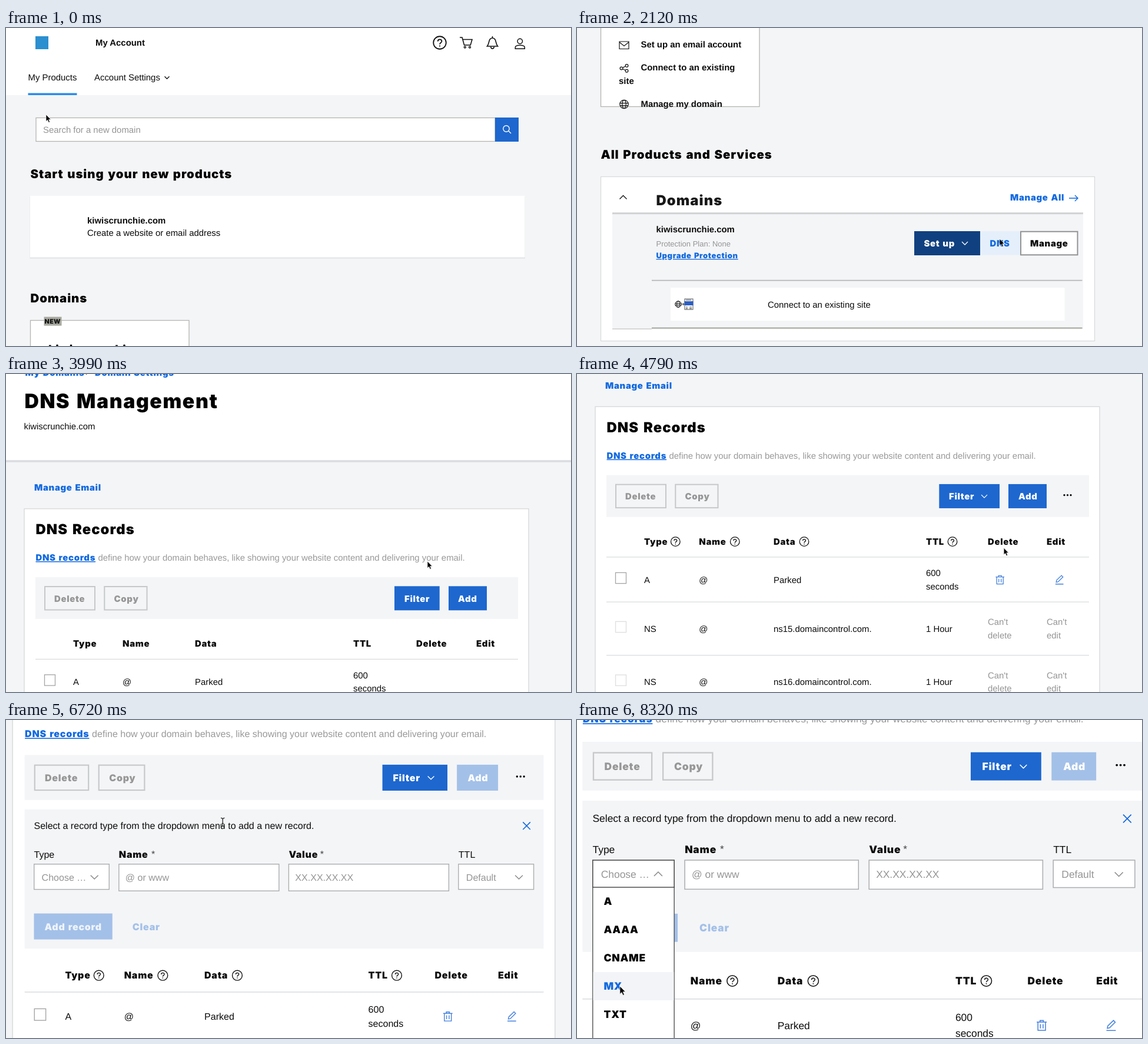
Recreate the animation shown at these times as an HTML page. Size 960 by 540 pixels, loop 8.39 s.

```html
<!DOCTYPE html>
<html lang="en">
<head>
<meta charset="utf-8">
<title>Domain account tour</title>
<style>
html, body { margin: 0; width: 100%; height: 100%; overflow: hidden; background: #f4f5f7; }
svg { display: block; width: 960px; height: 540px; }
text { font: 14.92px "Liberation Sans", Arial, sans-serif; text-rendering: geometricPrecision; white-space: pre; }
.bold { font-weight: 700; }
.black { font-family: Inter, "Arial Black", sans-serif; font-weight: 900; letter-spacing: .046em; word-spacing: .08em; }
.under { text-decoration: underline; }
</style>
</head>
<body>
<svg id="stage" viewBox="0 0 960 540"></svg>
<script>
const LOOP = 8390;
const BLUE = '#1d67cf', LINK = '#1169e0', PALE = '#a3c0e8', GRAY = '#959595', BG = '#f4f5f7';

// Drawing helpers
const text = (x, y, s, { cls = '', fill = '#0c0c0c', size, id } = {}) =>
  `<text ${id ? `id="${id}"` : ''} x="${x}" y="${y}" class="${cls}" fill="${fill}"` +
  `${size ? ` style="font-size:${size}px"` : ''}>${s}</text>`;
const bold = (x, y, s) => text(x, y, s, { cls: 'bold' });
const black = (x, y, s, fill, size, id) => text(x, y, s, { cls: 'black', fill, size, id });
const link = (x, y, s, size) => text(x, y, s, { cls: 'black under', fill: LINK, size });
const rect = (x1, y1, x2, y2, fill, extra = '') =>
  `<rect x="${x1}" y="${y1}" width="${x2 - x1}" height="${y2 - y1}" fill="${fill}" ${extra}/>`;
const frame = (x1, y1, x2, y2, color, w = 1.3, fill = '#fff', extra = '') =>
  rect(x1, y1, x2, y2, fill, `stroke="${color}" stroke-width="${w}" ${extra}`);
const path = (d, color = '#111', w = 1.3, extra = '') =>
  `<path d="${d}" fill="none" stroke="${color}" stroke-width="${w}" ${extra}/>`;
const rule = (x1, x2, y, color, w = 1.3) => path(`M${x1} ${y}H${x2}`, color, w);
const group = (id, body, extra = '') => `<g id="${id}" ${extra}>${body}</g>`;
const at = (x, y, body) => `<g transform="translate(${x} ${y})">${body}</g>`;
const circle = (r, w = 1.3, color = '#111', x = 0, y = 0) =>
  `<circle cx="${x}" cy="${y}" r="${r}" fill="none" stroke="${color}" stroke-width="${w}"/>`;
const chevron = (x, y, color = '#111', w = 5, up = false) => {
  const h = up ? -w / 2 : w / 2;
  return path(`M${x - w} ${y - h}L${x} ${y + h}L${x + w} ${y - h}`, color, 1.3);
};

// Icons, centred on the given point
const help = (x, y, k = 1) => at(x, y, `<g transform="scale(${k})">` + circle(7.8, 1.3) +
  path('M-2.4-1.6C-2.4-4.8 2.6-4.8 2.5-1.8C2.4 0 0 0 0 2M0 3.3V4.8', '#111', 1.3) + '</g>');
const globe = (x, y, r = 7.2, w = 1.2) => at(x, y, circle(r, w) +
  `<ellipse rx="${r * .45}" ry="${r}" fill="none" stroke="#111" stroke-width="${w}"/>` +
  path(`M${-r} ${-r * .25}H${r}M${-r} ${r * .3}H${r}`, '#111', w));
const trash = (x, y) => at(x, y, path('M-7.3-5H7.3M-2.5-5V-7.3H2.5V-5M-5.5-5V7H5.5V-5M-2-2V4.2M2-2V4.2', '#4480de', 1.3));
const pencil = (x, y) => at(x, y, path('M-5.5 4.5L-4.8 1L3.5-7L6-4.4L-2.3 3.8ZM-6.8 7.6H6.8', '#4480de', 1.3));
const cart = at(782, 25, path('M-11-9H-7L-3.4 4H7.2L10-5.5H-5.8', '#111', 1.6) +
  circle(1.5, 1.4, '#111', -2.2, 7.6) + circle(1.5, 1.4, '#111', 6, 7.6));
const bell = at(826.5, 25, path('M-9 6C-5 2-7-8 0-8C7-8 5 2 9 6ZM0-8V-11M-3 7C-2 11 2 11 3 7', '#111', 1.6));
const person = at(873.3, 27, circle(4.2, 1.5, '#111', 0, -4.5) + path('M-8 8.3V6C-8 1 8 1 8 6V8.3Z', '#111', 1.5));
const share = at(81, 111, circle(2.4, 1.2, '#111', -4.5, .5) + circle(2.4, 1.2, '#111', 4.5, -4) +
  circle(2.4, 1.2, '#111', 4.5, 4.8) + path('M-2.3-.6L2.4-3M-2.3 1.7L2.4 3.8', '#111', 1.2));

// Account page
const accountTop =
  rect(0, -5, 962, 114, '#fff') + rect(50, 14, 72, 36, '#2b8fd0') + bold(152, 30, 'My Account') +
  help(737, 25, 1.38) + cart + bell + person +
  text(37.5, 89, 'My Products') + text(150, 89, 'Account Settings') + chevron(273.5, 84.3, '#111', 4) +
  rect(37.5, 110.5, 120.5, 114, '#2a8cec') +
  frame(51, 152.5, 831, 192.5, '#b4b5b0') + text(63, 177.5, 'Search for a new domain', { fill: GRAY }) +
  rect(831, 152, 871, 193, BLUE) + circle(5.2, 1.4, '#fff', 850, 171) + path('M854 175L858 179', '#fff', 1.4) +
  black(41.5, 255, 'Start using your new products', '#000', 20.4) +
  rect(40.5, 286, 882, 391.5, '#e2e4e6') + rect(41, 285, 881.5, 389.5, '#fff') +
  bold(138, 331.7, 'kiwiscrunchie.com') + text(138, 353.3, 'Create a website or email address') +
  black(41.5, 466, 'Domains', '#000', 20.4) +
  frame(41.5, 496.5, 311, 746.5, '#b4b5b0') + rect(64.5, 490.5, 94.5, 505.5, '#a8a89f') +
  black(65.5, 502, 'NEW', '#111', 10.6) + black(72, 552, 'kiwiscrunchie.com', '#000', 18.7);

const serverIcon = globe(173, 512, 5.2, 1) + path('M179 512H183M181 510L183 512L181 514', '#333', 1) +
  frame(184, 503, 198, 521, '#555', 1) + rect(183.5, 507, 198.5, 514, '#2d5fc4') +
  path('M186 505H195M186 517H189M192 517H196M186 519.5H189M192 519.5H196', '#444', 1);

const accountBottom =
  at(81, 33, path('M-7-6H7V6.5H-7ZM-7-2H7M-4.5-4H-2', '#111', 1.2)) +
  at(81, 72, path('M-8-6H8V6.5H-8ZM-8-5L0 1.5L8-5', '#111', 1.2)) + share + globe(81, 172.5) +
  bold(109.5, 37.7, 'Create a website') + bold(109.5, 76.3, 'Set up an email account') +
  bold(109.5, 114.8, 'Connect to an existing') + bold(72, 138.3, 'site') + bold(109.5, 177.3, 'Manage my domain') +
  black(41.5, 265, 'All Products and Services', '#000', 20.4) +
  frame(41.5, 295.5, 880.5, 574.5, '#d8dadc') + chevron(79.5, 330.5, '#111', 6, true) +
  black(135.5, 344, 'Domains', '#181818', 23.8) + black(737, 336.3, 'Manage All', LINK) +
  path('M837 332H852M847 327L852 332L847 337', LINK, 1.4) +
  group('rowHover', rect(61, 359, 861, 554, BG)) + rule(61, 861, 357.8, '#d0d1d2', 3) +
  bold(135.5, 390, 'kiwiscrunchie.com') +
  text(135.5, 413.5, 'Protection Plan: None', { fill: GRAY, size: 13 }) + link(135.5, 434, 'Upgrade Protection', 13.1) +
  group('dnsHover', rect(686, 388, 755, 428.5, '#e5effc')) +
  rect(574, 388, 686, 429, '#10407f') + black(590.5, 414, 'Set up', '#fff') + chevron(660, 408.5, '#fff') +
  black(702.5, 414, 'DNS', LINK) + frame(755, 388.7, 851.5, 428.3, '#929292', 2) + black(771, 414, 'Manage') +
  rect(128.5, 472, 860, 553, BG) + rule(128, 859.5, 471.6, '#b5b6b5', 1.6) + rule(61, 128, 554, '#ccc') +
  rule(128, 859.5, 552.6, '#a3a59b', 2) + rect(160, 484, 829.5, 540, '#fff') + serverIcon +
  text(325, 517.5, 'Connect to an existing site');

// DNS page
const outlineButton = (x1, x2, label, tx) => frame(x1, 94, x2, 133.5, '#c6c8ca', 2, BG) + black(tx, 119.5, label, '#979797');
const button = (x1, x2, label, tx, id = '') => rect(x1, 93.3, x2, 134.3, BLUE, id && `id="${id}"`) + black(tx, 119.5, label, '#fff');

const dnsTop = at(0, -267,
  rect(-20, -60, 1000, 148, '#fff') + rule(-20, 1000, 148, '#dadce0', 3.4) +
  black(32.5, 3, 'My Domains', LINK) + path('M136-5L139-2L136 1', '#555', 1.2) + black(151, 3, 'Domain Settings', LINK) +
  black(31.5, 57.5, 'DNS Management', '#000', 33.8) + text(30.5, 94, 'kiwiscrunchie.com') +
  black(48, 198.3, 'Manage Email', LINK) + frame(31, 228.8, 888, 1500, '#d6d8db') +
  black(50.5, 272, 'DNS Records', '#000', 23.8) + link(50.5, 317, 'DNS records') +
  text(156.5, 317, 'define how your domain behaves, like showing your website content and delivering your email.', { fill: '#999' }) +
  rect(50, 345, 870, 416, BG)) +
  outlineButton(66, 151, 'Delete', 82) + outlineButton(167.3, 239.5, 'Copy', 183.5);

const records = [
  [261, 'A', '@', 'Parked', '600|seconds', 293.5],
  [344, 'NS', '@', 'ns15.domaincontrol.com.', '1 Hour', 384],
  [434.6, 'NS', '@', 'ns16.domaincontrol.com.', '1 Hour', 474.5],
  [515.6, 'CNAME', 'www', 'kiwiscrunchie.com.', '1 Hour', 547]
];
const twoLines = (x, y, s, fill) => {
  const [first, second] = s.split('|');
  return second ? text(x, y - 11.5, first, { fill }) + text(x, y + 11, second, { fill }) : text(x, y, first, { fill });
};
function table(cols, loaded) {
  const heads = ['Type', 'Name', 'Data', 'TTL', 'Delete', 'Edit'];
  let out = heads.map((h, i) => black(cols[i], 196, h)).join('') + rule(50, 870, 217.3, '#d9dbdd');
  if (loaded) out += [167.3, 268.3, 386, 638].map(x => help(x, 191)).join('');
  for (const [y, type, name, data, ttl, bottom] of records) {
    const fixed = type === 'NS';
    out += frame(65.5, y - 17.3, 83.5, y + 1, fixed ? '#dedede' : '#a5a5a5') +
      text(cols[0], y, type) + text(cols[1], y, name) + text(cols[2], y, data) +
      twoLines(cols[3], y, ttl) + rule(50, 870, bottom, '#d9dbdd');
    if (!loaded) continue;
    out += fixed
      ? twoLines(cols[4], y, "Can't|delete", GRAY) + twoLines(cols[5], y, "Can't|edit", GRAY)
      : trash(718.7, y - 5) + pencil(819.7, y - 5.5);
  }
  return out;
}

const pending = button(660, 736.7, 'Filter', 677) + button(752, 817, 'Add', 768) +
  table([114, 198, 321, 590, 697, 799], false);
const dots = [828, 833.5, 839].map(x => `<circle cx="${x}" cy="112" r="1.6"/>`).join('');
const ready = button(615.3, 718, 'Filter', 632) + chevron(692, 114, '#fff') + button(733, 798, 'Add', 750, 'addButton') +
  dots + group('records', table([114, 207.3, 334, 593, 698, 798], true));

const field = (x1, x2, hint, tx, y2 = 292.6, id = '') =>
  frame(x1, 250.3, x2, y2, '#abadaf', 1.3, '#fff', id && `id="${id}"`) + text(tx, 276.4, hint, { fill: GRAY });
const form = rect(50, 163.8, 870, 383.8, BG) +
  text(64.8, 195, 'Select a record type from the dropdown menu to add a new record.') +
  path('M837.3 184L849 195.7M849 184L837.3 195.7', LINK, 1.5) +
  text(64.8, 240, 'Type') + black(199, 240, 'Name') + text(250.3, 239, '*', { fill: '#444' }) +
  black(467.3, 240, 'Value') + text(517, 239, '*', { fill: '#444' }) + text(735.5, 240, 'TTL') +
  field(65, 183.6, 'Choose …', 77, 290.2, 'typeField') + group('typeClosed', chevron(160.3, 270.9, '#888', 6)) +
  field(199, 451.9, '@ or www', 209.2) + field(467.3, 720.2, 'XX.XX.XX.XX', 477.5) +
  field(735.5, 854.3, 'Default', 747.6, 290.2) + chevron(831, 270.9, '#888', 6) +
  rect(64.8, 328.2, 188.7, 369.2, PALE) + black(81.6, 354.4, 'Add record', '#eef4fc') + black(220.4, 354.4, 'Clear', PALE);

const types = ['A', 'AAAA', 'CNAME', 'MX', 'TXT'];
const STEP = 41.1, FIRST = 289.8;
const menu = chevron(160.3, 270.5, '#888', 6, true) + frame(65, FIRST, 183.6, 620, '#444', 1.1) +
  rect(65.6, 0, 183, STEP, '#f3f4f7', 'id="option"') +
  types.map((s, i) => black(81, FIRST + STEP * (i + .5) + 5.2, s, '#000', undefined, 'type' + i)).join('');

const pointer = `<path id="arrow" d="M0 0V11.6L2.6 9.2L4.6 13.4L6.5 12.5L4.7 8.4H8.2Z" fill="#000" stroke="#fff" stroke-width=".7"/>` +
  path('M-3-6.5Q0-6.5 0-4.5Q0-6.5 3-6.5M0-4.5V5M-3 7Q0 7 0 5Q0 7 3 7M-1.5 2H1.5', '#222', 1.2, 'id="beam"');

stage.innerHTML = rect(0, 0, 960, 540, BG) +
  group('account', group('top', accountTop) + group('bottom', accountBottom)) +
  group('zoom', group('dns', rect(-60, -60, 1080, 660, BG) +
    group('scroller', dnsTop + group('pending', pending) + group('ready', ready) +
      group('form', form) + group('menu', menu))) + group('cursor', pointer));

// Motion: eased values between [time, ...values] stops
function track(t, stops) {
  if (t <= stops[0][0]) return stops[0].slice(1);
  for (let i = 1; i < stops.length; i++) {
    const [t0, ...a] = stops[i - 1], [t1, ...b] = stops[i];
    if (t < t1) {
      const p = (t - t0) / (t1 - t0), e = p * p * (3 - 2 * p);
      return a.map((v, k) => v + (b[k] - v) * e);
    }
  }
  return stops[stops.length - 1].slice(1);
}
const accountScroll = [[50, 0, 0], [500, 300, 0], [850, 300, 0], [1190, 570, 0], [1300, 570, 0], [1800, 613, -1]];
const dnsScroll = [[4100, 267], [5250, 0]];
const zoomStops = [[6370, 1], [7120, 1.167]];
const cursorStops = [
  [50, 68, 147], [480, 3, 438], [1220, 3, 438], [2060, 718, 358], [2590, 718, 358], [2680, 716, 318],
  [4000, 716, 318], [5200, 728.5, 287], [5560, 728.5, 287], [5950, 765, 116], [6340, 765, 116],
  [6720, 363, 184], [7200, 122, 272], [7720, 122, 272], [8300, 104.5, 433.6]
];

const el = id => document.getElementById(id);
const set = (id, name, value) => el(id).setAttribute(name, value);
const show = (id, on) => set(id, 'display', on ? 'inline' : 'none');
const move = (id, x, y) => set(id, 'transform', `translate(${x} ${y})`);

function draw(t) {
  const [scroll, shift] = track(t, accountScroll);
  const [x, y] = track(t, cursorStops);
  const [scale] = track(t, zoomStops);
  const formOpen = t >= 6050, menuOpen = t >= 7380;

  show('account', t < 2720);
  move('account', shift, -scroll);
  move('bottom', 0, 570);
  show('rowHover', x > 60 && t > 1220);
  show('dnsHover', x > 685 && t > 1220);

  show('dns', t >= 2560);
  set('dns', 'opacity', track(t, [[2560, 0], [2720, 1]])[0]);
  set('zoom', 'transform', `translate(294 324) scale(${scale}) translate(-294 -324)`);
  move('scroller', 0, track(t, dnsScroll)[0]);
  show('pending', t < 4400);
  show('ready', t >= 4400);
  show('form', formOpen);
  move('records', 0, formOpen ? 235 : 0);
  set('addButton', 'fill', formOpen ? PALE : BLUE);

  show('menu', menuOpen);
  show('typeClosed', !menuOpen);
  set('typeField', 'stroke', menuOpen ? '#444' : '#abadaf');
  const hovered = menuOpen ? Math.floor((y - FIRST) / STEP) : -1;
  show('option', hovered >= 0);
  set('option', 'y', FIRST + STEP * Math.max(hovered, 0));
  types.forEach((_, i) => set('type' + i, 'fill', i === hovered ? LINK : '#000'));

  const overText = t > 6600 && t < 6900;
  show('arrow', !overText);
  show('beam', overText);
  move('cursor', x, y);
}

const start = performance.now();
function tick() {
  draw((performance.now() - start) % LOOP);
  requestAnimationFrame(tick);
}
tick();
</script>
</body>
</html>
```
